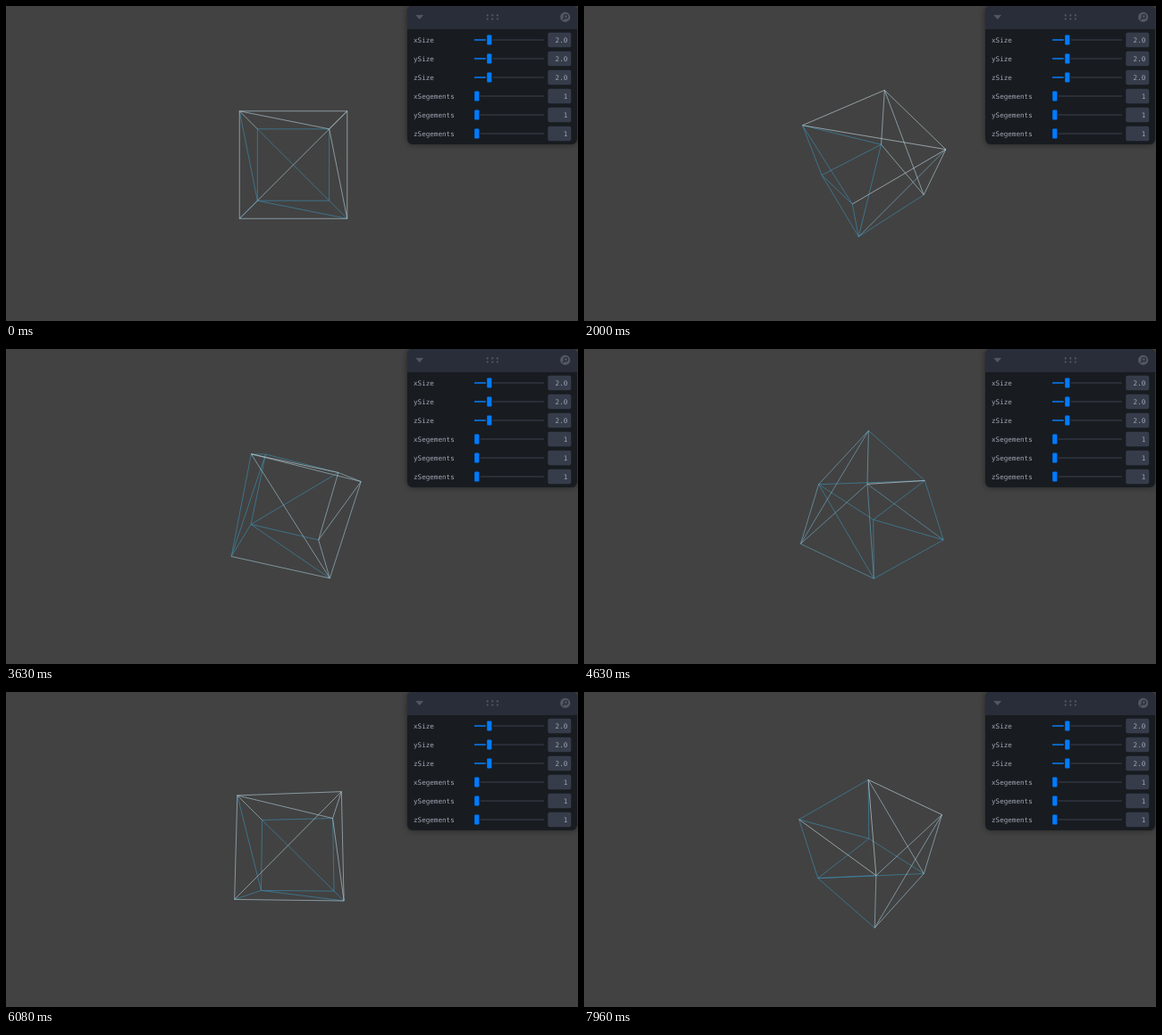
Animation of 640 by 353 pixels, one loop 8 s. Source, as an HTML page with a canvas:

```html
<!DOCTYPE html>
<html lang="en">
<head>
<meta charset="utf-8">
<title>Wireframe box</title>
<style>
  html, body { margin: 0; width: 100%; height: 100%; overflow: hidden; background: #424242; }
  canvas, svg { position: absolute; left: 0; top: 0; width: 640px; height: 353px; }
  .panel { filter: drop-shadow(0 0 3px #0007); }
  text { font: 7.6px "DejaVu Sans Mono", monospace; fill: #a0a5b3; }
  .value { text-anchor: end; }
</style>
</head>
<body>
<canvas width="640" height="353"></canvas>
<svg viewBox="0 0 640 353">
  <g class="panel">
    <rect x="449" y="0" width="190" height="155" rx="6" fill="#181c20"/>
    <path d="M449 26V6a6 6 0 0 1 6-6h178a6 6 0 0 1 6 6v20z" fill="#292d39"/>
  </g>
  <path d="M459 10.4h7.4l-3.7 4.2z" fill="#535760" stroke="#535760" stroke-width=".8" stroke-linejoin="round"/>
  <g id="grip" fill="#535760"></g>
  <circle cx="625.7" cy="12.4" r="5.6" fill="#535760"/>
  <g fill="none" stroke="#292d39" stroke-width="1.3" stroke-linecap="round">
    <circle cx="626.4" cy="11.7" r="2.1"/>
    <path d="M624.8 13.3l-1.8 1.8"/>
  </g>
  <g id="rows"></g>
</svg>
<script>
const PERIOD = 8000, FPS = 24;
const SPIN = 0.5;                       // radians per second
const FOCAL = 241, DISTANCE = 5, CX = 321.5, CY = 178;
const TEAL = [62, 140, 172], WHITE = [205, 214, 218];

function buildPanel() {
  const controls = [
    ['xSize', '2.0', 14], ['ySize', '2.0', 14], ['zSize', '2.0', 14],
    ['xSegements', '1', 0], ['ySegements', '1', 0], ['zSegements', '1', 0]
  ];
  document.getElementById('rows').innerHTML = controls.map(([label, value, fill], i) => `
    <g transform="translate(0 ${38 + i * 21})">
      <text x="456" y="2.6">${label}</text>
      <rect x="524" y="-.7" width="78" height="1.4" rx=".7" fill="#30343f"/>
      <rect x="524" y="-.7" width="${fill}" height="1.4" fill="#007bff"/>
      <rect x="${523.5 + fill}" y="-6.2" width="6.6" height="12.4" rx="1.6"
        fill="#007bff" stroke="#181c20" stroke-width="1.4"/>
      <rect x="606.3" y="-8.3" width="26" height="16.6" rx="2" fill="#373c4b"/>
      <text class="value" x="628.3" y="2.6">${value}</text>
    </g>`).join('');
  document.getElementById('grip').innerHTML = [0, 1, 2, 3, 4, 5].map(i =>
    `<circle cx="${538.7 + i % 3 * 5.6}" cy="${i < 3 ? 10.5 : 14.6}" r="1.15"/>`).join('');
}

// Corner bits: 1 = +x, 2 = +y, 4 = +z. Each face lists its corners in a ring;
// the diagonal joins the first and third.
const FACES = [
  { axis: 0, sign: 1, ring: [5, 1, 3, 7] },
  { axis: 0, sign: -1, ring: [0, 4, 6, 2] },
  { axis: 1, sign: 1, ring: [6, 2, 3, 7] },
  { axis: 1, sign: -1, ring: [0, 4, 5, 1] },
  { axis: 2, sign: 1, ring: [4, 6, 7, 5] },
  { axis: 2, sign: -1, ring: [1, 3, 2, 0] }
];

// A shared edge takes the colour of the last face that contains it.
const edges = new Map();
FACES.forEach(({ ring: [a, b, c, d] }, face) => {
  for (const [p, q] of [[a, b], [b, c], [c, d], [d, a], [a, c]])
    edges.set(Math.min(p, q) * 8 + Math.max(p, q), face);
});

const ctx = document.querySelector('canvas').getContext('2d');

function axesAt(angle) {
  const s = Math.sin(angle), c = Math.cos(angle);
  return [[c, -s * s, c * s], [0, c, s], [-s, -s * c, c * c]];
}

function project(corner, axes) {
  const [x, y, z] = [0, 1, 2].map(k =>
    axes.reduce((sum, axis, i) => sum + (corner >> i & 1 ? 1 : -1) * axis[k], 0));
  const scale = FOCAL / (DISTANCE - z);
  return [CX + x * scale, CY - y * scale];
}

// Brightness under a white light shining from (1, 1, 1).
function lightOn({ axis, sign }, axes) {
  const [x, y, z] = axes[axis];
  return Math.max(0, sign * (x + y + z) / Math.sqrt(3));
}

function lineColor(light) {
  const mix = Math.min(1, Math.pow(light, 0.45));
  return `rgb(${TEAL.map((v, i) => Math.round(v + (WHITE[i] - v) * mix))})`;
}

function draw(ms) {
  const step = Math.floor((ms % PERIOD + 4.9) * FPS / 1000) % (PERIOD * FPS / 1000);
  const axes = axesAt(step / FPS * SPIN);
  const points = Array.from({ length: 8 }, (_, corner) => project(corner, axes));
  const lights = FACES.map(face => lightOn(face, axes));
  ctx.clearRect(0, 0, 640, 353);
  ctx.lineWidth = 0.9;
  ctx.globalAlpha = 0.74;
  // Bright lines go last so that they stay on top where lines coincide.
  const dimFirst = [...edges].sort((a, b) => lights[a[1]] - lights[b[1]]);
  for (const [key, face] of dimFirst) {
    ctx.strokeStyle = lineColor(lights[face]);
    ctx.beginPath();
    ctx.moveTo(...points[key >> 3]);
    ctx.lineTo(...points[key & 7]);
    ctx.stroke();
  }
}

buildPanel();
const start = performance.now();
function tick() {
  draw(performance.now() - start);
  requestAnimationFrame(tick);
}
tick();
</script>
</body>
</html>
```
